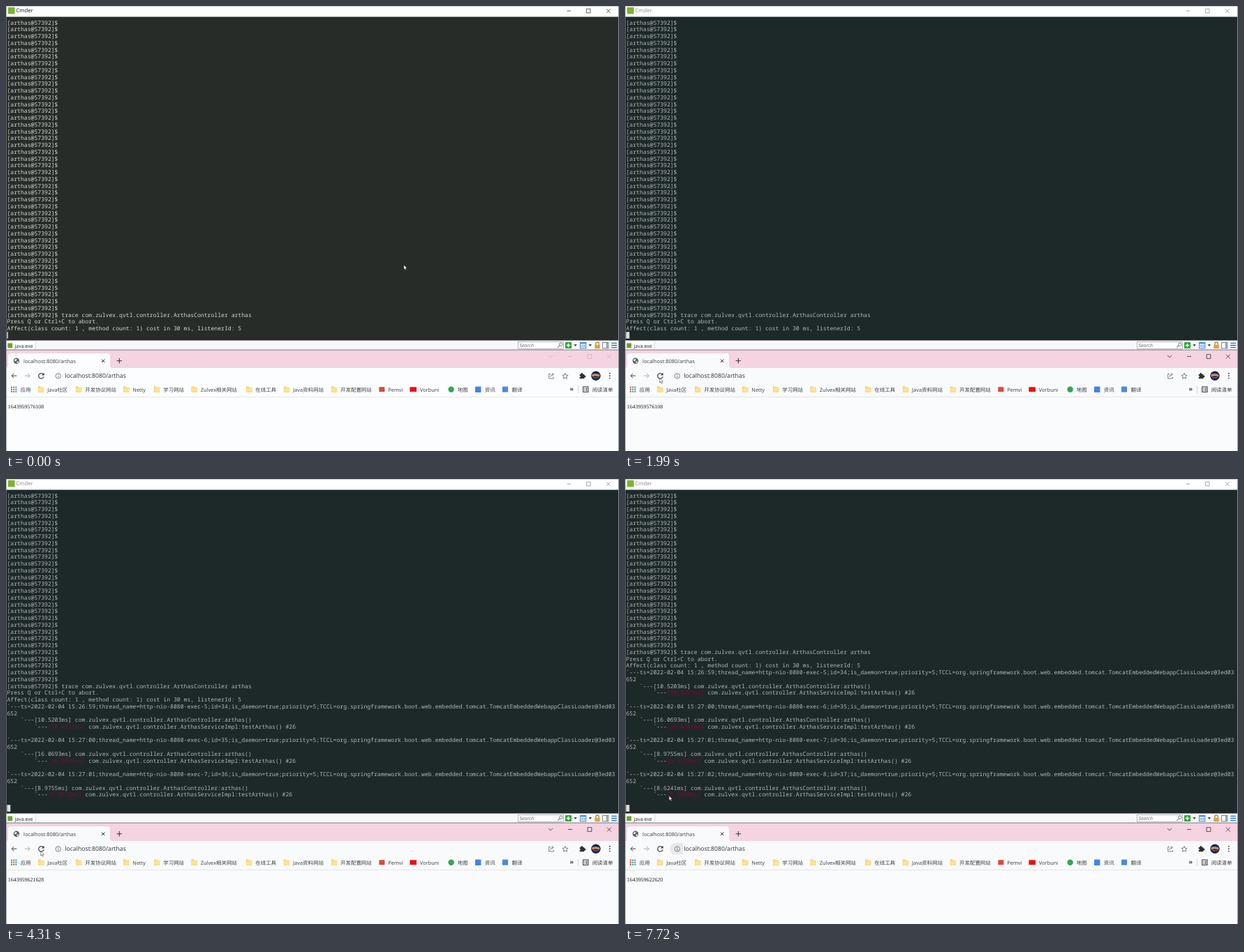
These frames come from a looping animation (878 px wide and 638 px high, 7.99 s). An HTML page:

```html
<!DOCTYPE html>
<html lang="zh-CN">
<head>
<meta charset="utf-8">
<title>Trace session</title>
<style>
  html, body { margin: 0; width: 100%; height: 100%; overflow: hidden; background: #fcfdfe; }
  svg { display: block; width: 878px; height: 638px; }
  text { white-space: pre; text-rendering: geometricPrecision; }
  .ui { font-family: "Open Sans", "Noto Sans CJK SC", "Noto Sans CJK", sans-serif; font-size: 7.45px; fill: #3c4043; }
  .mono { font-family: "Noto Sans Mono", "DejaVu Sans Mono", monospace; font-size: 8.12px; fill: var(--ink); }
  .num { font-family: "Liberation Serif", serif; font-size: 7.93px; fill: #222; }
  .red { fill: #7d0b38; }
  .line { fill: none; stroke: #3c4043; stroke-width: 1; }
  svg { --term: #272c29; --ink: #d3d5d3; --title: #1a1a1a; --ctl: #333; --wctl: #d3b3c2; --page: #fcfdfe; --bar: #fcfdfe; }
  svg.away { --term: #1d2829; --ink: #b0b7b6; --title: #8b8b8b; --ctl: #8f8f8f; --wctl: #4a4147; --page: #f9fbfc; --bar: #f8fafb; }
</style>
</head>
<body>
<svg id="stage" viewBox="0 0 878 638" xmlns="http://www.w3.org/2000/svg"></svg>
<script>
const LOOP = 7990, ROWS = 46, ROW_H = 9.744;
const svg = document.getElementById('stage');

// Drawing helpers
const rect = (x, y, w, h, fill, more = '') =>
  `<rect x="${x}" y="${y}" width="${w}" height="${h}" fill="${fill}" ${more}/>`;
const dot = (x, y, r, fill, more = '') => `<circle cx="${x}" cy="${y}" r="${r}" fill="${fill}" ${more}/>`;
const line = (d, more = '') => `<path class="line" d="${d}" ${more}/>`;
const shape = (d, fill) => `<path d="${d}" fill="${fill}"/>`;
const label = (x, y, s, more = '') => `<text class="ui" x="${x}" y="${y}" ${more}>${s}</text>`;

const folder = x =>
  shape(`M${x} 545.6h3.2l1 1.1h4.2v7.2h-8.4z`, '#f3cf63') + rect(x + .5, 547.2, 7.6, 6.4, '#fde293');

function windowControls(y, colour) {
  const s = `style="stroke:${colour};stroke-width:.8"`;
  return line(`M803.5 ${y}h5.5`, s) + line(`M831.3 ${y - 2.8}h5.6v5.6h-5.6z`, s) +
    line(`M860 ${y - 2.8}l5.6 5.6m0 -5.6l-5.6 5.6`, s);
}

function terminal() {
  let s = rect(0, 0, 878, 15.5, '#fdfefe') + rect(0, 0, 878, .6, '#a9acad') +
    rect(3, 1.8, 9.6, 9.6, '#7cb32c') +
    label(14.5, 9.4, 'Cmder', 'style="font-size:7.7px;fill:var(--title)"') +
    windowControls(7, 'var(--ctl)') +
    rect(0, 15.5, 878, 464.2, 'var(--term)');
  for (let i = 0; i < ROWS; i++)
    s += `<text class="mono" x="1.5" y="${(26.7 + i * ROW_H).toFixed(2)}"></text>`;
  return s + '<rect id="caret" x="1.4" y="467.2" height="9.6" fill="#dcdedd"/>';
}

function statusBar() {
  const arrow = x => shape(`M${x - 2.2} 485.2h4.4l-2.2 2.6z`, '#222');
  return rect(0, 479.7, 878, 13.3, '#f6f8fa') + rect(1, 480, 41.5, 12.4, '#fdfefe') +
    line('M42.5 480.5v11.5', 'style="stroke:#c9ced4;stroke-width:.7"') +
    rect(2.4, 483.4, 6.8, 6.8, '#6f9f2c') +
    label(12.6, 489.7, 'java.exe', 'style="font-size:7px;fill:#222"') +
    rect(733.5, 481.5, 65, 10, '#fff', 'stroke="#a2a8ae" stroke-width=".8"') +
    label(735.5, 489.1, 'Search', 'style="font-size:6.9px;font-style:italic;fill:#666"') +
    line('M793.2 486.8l-3 3', 'style="stroke:#555"') +
    dot(794.8, 485.2, 2.2, 'none', 'stroke="#555" stroke-width=".8"') +
    rect(801, 482, 9, 9, '#2fa53a', 'rx="1"') +
    line('M805.5 483.8v5.4M802.8 486.5h5.4', 'style="stroke:#fff;stroke-width:1.4"') +
    arrow(815.6) +
    rect(822.4, 482.4, 8.4, 8.4, '#e1eefb', 'stroke="#3c7cc4" stroke-width=".9"') +
    rect(822.4, 482.2, 8.4, 2, '#4b8ad0') + rect(824.2, 485.8, 2, 3, '#7fb1e6') + rect(827.4, 485.8, 2, 3, '#7fb1e6') +
    arrow(836.8) +
    line('M844.8 486v-2a2.2 2.2 0 0 1 4.4 0v2', 'style="stroke:#a8813a;stroke-width:1.2"') +
    rect(843.2, 485.8, 7.6, 5.4, '#dfa24c', 'rx=".6"') +
    rect(854.6, 482.4, 8.2, 8.4, '#fff', 'stroke="#6c7480" stroke-width=".9"') +
    rect(859.6, 483, 2.8, 7.4, '#9aa5b5') +
    line('M867.2 483.4h7.6M867.2 486.5h7.6M867.2 489.6h7.6', 'style="stroke:#2c6fbf;stroke-width:1.3"') +
    rect(0, 492.6, 878, 1.1, '#60666a');
}

function browserFrame() {
  const wc = 'style="stroke:var(--wctl);stroke-width:.9"';
  return rect(0, 493.7, 878, 25.3, '#f5d3e1') +
    shape('M0 519q3 0 3-3v-14q0-4 4-4h138q4 0 4 4v14q0 3 3 3z', 'var(--bar)') +
    rect(0, 519, 878, 41.3, 'var(--bar)') +
    rect(0, 560.2, 878, .8, '#dfe2e5') +
    rect(0, 561, 878, 77, 'var(--page)') +
    label(25, 511.7, 'localhost:8080/arthas') +
    line('M137 506.6l4.4 4.4m0-4.4l-4.4 4.4', 'style="stroke:#222"') +
    line('M162.3 505v7.4M158.6 508.7h7.4', 'style="stroke:#333"') +
    line('M777 501l3 2.8 3-2.8', wc) + line('M805 502.4h6', wc) +
    line('M833 499.6h5.8v5.8h-5.8z', wc) + line('M861 499.6l5.8 5.8m0-5.8l-5.8 5.8', wc);
}

function toolbar() {
  const soft = 'style="stroke:#5f6368;stroke-width:.8"';
  return line('M15.3 530.2h-7M11.4 526.9l-3.3 3.3 3.3 3.3') +
    line('M27 530.2h7M31 526.9l3.3 3.3-3.3 3.3', 'style="stroke:#a9adb1"') +
    dot(74.8, 530.4, 3.7, 'none', 'stroke="#5f6368" stroke-width=".8"') +
    line('M74.8 529.8v2.6M74.8 528v.9', 'style="stroke:#5f6368;stroke-width:.9"') +
    label(84.3, 533.3, 'localhost:8080/arthas', 'style="font-size:8.7px;fill:#303337"') +
    line('M780 527.4h-2.3v6.6h6.8v-2M779.8 531.8q.4-3.6 4-3.6m-1.6-2l2.2 2-2.2 2', soft) +
    line('M801 526.4l1.2 2.7 2.9.3-2.2 1.9.7 2.9-2.6-1.5-2.6 1.5.7-2.9-2.2-1.9 2.9-.3z', soft) +
    rect(821.6, 528, 6.8, 6.2, '#2d3033', 'rx=".8"') + dot(824.8, 527.6, 1.5, '#2d3033') +
    dot(828.9, 531, 1.5, '#2d3033') + dot(821.8, 531.2, 1.1, 'var(--bar)') +
    dot(844.9, 530.2, 6.7, '#1c2150') +
    shape('M839 528.4q6-3 11.6.4l-1 3q-5-2.4-9.800 0z', '#c98f55') + rect(841, 532.2, 7.6, 1.4, '#6c5a86') +
    [526.8, 530.2, 533.6].map(y => dot(864.8, y, .95, '#444')).join('');
}

function bookmarks() {
  const folders = [[46, 'Java社区'], [100, '开发协议网站'], [168, 'Netty'], [212, '学习网站'],
    [265.4, 'Zulvex相关网站'], [344, '在线工具'], [397.8, 'Java资料网站'], [465.8, '开发配置网站']];
  const y = 552.7, dots = ['#ea4335', '#34a853', '#4285f4', '#fbbc05'];
  let s = '';
  for (let i = 0; i < 9; i++)
    s += rect(7 + i % 3 * 3.2, 545.6 + Math.floor(i / 3) * 3.1, 2, 2, dots[(i + Math.floor(i / 3)) % 4]);
  s += label(20.8, y, '应用');
  for (const [x, name] of folders) s += folder(x) + label(x + 13.3, y, name);
  return s +
    rect(534.4, 546.2, 8, 7, '#e0473c') + label(547.3, y, 'Pemvi') +
    rect(578.4, 546.3, 9.6, 6.8, '#f00b12') + label(592.8, y, 'Vorbuni') +
    dot(637.6, 549.7, 4.2, '#35a556') + label(646.8, y, '地图') +
    rect(672, 545.6, 8.4, 8.4, '#4383ea') + label(685.8, y, '资讯') +
    rect(711, 545.6, 8, 8, '#4a87e8') + label(724.8, y, '翻译') +
    label(807.4, 552.3, '»', 'style="font-size:9px;font-weight:700"') +
    line('M819.5 544.500v10.4', 'style="stroke:#c8ccd0;stroke-width:.8"') +
    rect(826.6, 546, 7.4, 7.4, 'none', 'stroke="#333" stroke-width="1"') +
    line('M828 548.200h1M830 548.200h2.8M828 549.800h1M830 549.800h2.8M828 551.400h1M830 551.400h2.8',
      'style="stroke:#333;stroke-width:.8"') +
    label(839.7, y, '阅读清单');
}

const pill = (w, id) => `<path id="${id}" d="M${64 + w} 521.800h${8.4 - w}a8.400 8.400 0 0 0 0 16.800h${w - 8.4}z" fill="#e7e9eb"/>`;

svg.innerHTML = terminal() + statusBar() + browserFrame() +
  pill(29, 'pillA') + pill(19, 'pillB') +
  rect(42.5, 541.8, 50.5, 15.8, '#e9ebed', 'rx="7.900" id="markHover"') +
  dot(50.4, 530.3, 8.2, '#dfe2e4', 'id="ring"') +
  toolbar() + bookmarks() +
  `<g id="idle">${line('M53.600 528.100a3.800 3.800 0 1 0 .6 3.200', 'style="stroke-width:1.200"')}
    ${shape('M54.700 525.800v3.700h-3.700z', '#3c4043')}
    ${dot(15, 508.8, 4.2, '#5f6368')}
    ${shape('M12 507.200l2.600-1.400 1.200 1.600-1.800 1.800-1.800-.400zM15.400 510.200l2.400-1.200.2 1.600-2 1.600z', '#f3f4f5')}</g>` +
  `<g id="busy">${line('M47.200 527.200l6.400 6.400m0-6.400l-6.400 6.400', 'style="stroke-width:1.200"')}
    ${line('M15 504.800a4 4 0 1 0 4 4', 'style="stroke:#5f6368"')}</g>` +
  '<text id="stamp" class="num" x="2.8" y="576.500"></text>' +
  rect(0, 0, .7, 638, '#7d8283') + rect(877, 0, 1, 638, '#8b9091') +
  '<path id="mouse" d="M0 0v6.500l1.500-1.300 1.050 2.400 1.050-.450-1-2.300h2z" fill="#fff" stroke="#111" stroke-width=".45"/>';

// Terminal contents
const prompt = '[arthas@57392]$';
const base = [...Array(43).fill(prompt),
  prompt + ' trace com.zulvex.qvtl.controller.ArthasController arthas',
  'Press Q or Ctrl+C to abort.',
  'Affect(class count: 1 , method count: 1) cost in 30 ms, listenerId: 5'];
const calls = [['26:59', '10.5203', '10.4231'], ['27:00', '16.0693', '16.0041'],
  ['27:01', '8.9755', '8.9152'], ['27:02', '8.6241', '8.5698']];

const traceLines = ([clock, total, inner], i) => [
  `\`---ts=2022-02-04 15:${clock};thread_name=http-nio-8080-exec-${5 + i};id=${34 + i};is_daemon=true;priority=5;` +
    'TCCL=org.springframework.boot.web.embedded.tomcat.TomcatEmbeddedWebappClassLoader@3ed03',
  '652',
  `    \`---[${total}ms] com.zulvex.qvtl.controller.ArthasController:arthas()`,
  `        \`---<tspan class="red">[${inner}ms]</tspan> com.zulvex.qvtl.controller.ArthasServiceImpl:testArthas() #26`,
  ''];
const screens = [0, 1, 2, 3, 4].map(n =>
  base.concat(calls.slice(0, n).flatMap(traceLines)).slice(-ROWS));

// Timeline: [start ms, value]
const traces = [[0, 0], [2260, 1], [3240, 2], [4310, 3], [5580, 4]];
const stamps = [[0, '576108'], [2260, '619583'], [3240, '620615'], [4310, '621628'], [5190, '622620']];
const blink = [[0, 1], [400, 0], [940, 1], [1450, 0], [1870, 1]];
const loading = [[0, 0], [2110, 1], [2260, 0], [3090, 1], [3240, 0], [4160, 1], [4310, 0], [5070, 1], [5190, 0]];
const pressed = [[0, 0], [2110, 1], [2260, 0], [3090, 1], [3240, 0], [4160, 1], [4310, 0], [5070, 1], [5580, 0]];
const path = [[0, [569.8, 371.2]], [670, [535.2, 431]], [790, null], [940, [294.5, 592]], [1060, [162, 561.3]],
  [1180, [88, 541]], [1300, [10.5, 536.2]], [1450, [5.2, 535.6]], [1600, [44.4, 542]], [1870, [49.8, 533.6]],
  [6140, [79.2, 472.6]], [6260, [79, 459]], [6380, [77.6, 453.4]], [6530, [70, 455]], [6650, [63.3, 457]],
  [6900, [63.5, 456.6]], [7050, [63.4, 456]], [7170, [63.4, 455.7]], [7290, [63.3, 455.2]], [7720, [63.1, 454.2]]];

const at = (table, t) => table.findLast(step => step[0] <= t)[1];
const get = id => document.getElementById(id);
const show = (id, on) => get(id).setAttribute('visibility', on ? 'visible' : 'hidden');
const rows = [...svg.querySelectorAll('.mono')];
let shown = -1;

function draw(t) {
  const count = at(traces, t);
  if (count !== shown) {
    rows.forEach((row, i) => row.innerHTML = screens[count][i]);
    shown = count;
  }
  const away = t >= 1990, busy = at(loading, t), pos = at(path, t);
  svg.classList.toggle('away', away);
  get('caret').setAttribute('width', away ? 5 : 1.5);
  show('caret', away || at(blink, t));
  get('stamp').textContent = '1643959' + at(stamps, t);
  show('idle', !busy);
  show('busy', busy);
  show('ring', at(pressed, t));
  show('pillA', t >= 1180 && !away);
  show('markHover', t >= 1180 && !away);
  show('pillB', t >= 6140);
  show('mouse', pos);
  if (pos) get('mouse').setAttribute('transform', `translate(${pos})`);
}

const start = performance.now();
function tick() {
  draw((performance.now() - start) % LOOP);
  requestAnimationFrame(tick);
}
tick();
</script>
</body>
</html>
```
